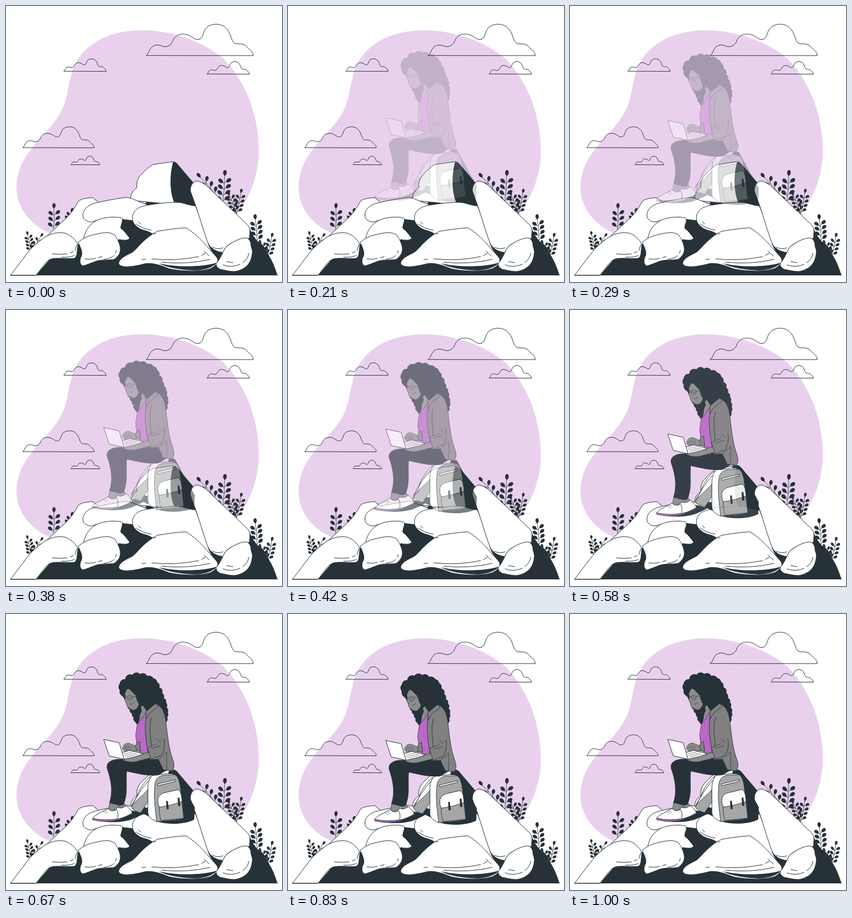
Write an HTML page that moves like this. It is 500x500 px and loops after 1040 ms.

```html
<!DOCTYPE html>
<html lang="en">
<head>
<meta charset="utf-8">
<title>Working on the mountain</title>
<style>
  html, body { margin: 0; width: 100%; height: 100%; overflow: hidden; background: #fff; }
  svg { display: block; width: 100vw; height: 100vh; }
  .line { fill: none; stroke: #263238; stroke-width: 1; stroke-linecap: round; stroke-linejoin: round; }
  .rock, .white { fill: #fff; stroke: #263238; stroke-width: 1; stroke-linejoin: round; }
  .dark { fill: #263238; }
  .skin { fill: #8c8c8c; stroke: #263238; stroke-width: .7; }
  .cloth { fill: #808080; stroke: #263238; stroke-width: .9; stroke-linejoin: round; }
  .bag { fill: #a6a6a6; stroke: #263238; stroke-width: .9; stroke-linejoin: round; }
  .purple { fill: #ba68c8; stroke: #263238; stroke-width: .7; }
  .fine { stroke-width: .7; }
  .keys { stroke: #808080; stroke-dasharray: 2 1; }
</style>
</head>
<body>
<svg viewBox="0 0 500 500">
  <defs>
    <path id="cloud" class="line" vector-effect="non-scaling-stroke"
      d="M0 0C5-3 5-10 10-15C17-21 24-19 31-16C38-15 45-18 48-26C53-38 64-41 76-37C84-34 89-27 96-29C105-33 102-44 110-51C120-59 136-58 144-50C154-41 153-27 160-22C166-19 174-24 182-16C187-9 193-9 194 0Z"/>
  </defs>

  <path fill="#e9d1ee" d="M243 44C300 43 356 64 394 95C436 139 458 200 458 262C458 310 440 350 415 382L300 440L92 416C45 402 19 365 19 328C19 275 62 243 86 212C113 178 108 160 119 122C134 70 185 45 243 44Z"/>
  <g id="clouds"></g>
  <g id="plants" class="dark"></g>

  <g id="rocks">
    <path class="dark" d="M54 488L78 460L130 425L210 388L250 362L290 300L343 325L420 390L441 402C446 413 450 421 457 427C466 432 470 438 474 448C480 458 485 466 492 488Z"/>
    <path class="rock" d="M66 424L104 389C118 377 124 366 131 354C137 348 149 348 157 347L168 356L200 400L150 430L131 432Z"/>
    <path class="rock" d="M226 352C225 341 229 335 237 329C236 317 240 310 246 304C254 296 260 290 267 287C280 285 294 283 303 282L308 360Z"/>
    <path class="dark" d="M303 282C308 282 310 285 314 290L342 323L346 370L306 358C296 340 296 304 303 282Z"/>
    <path class="rock" d="M140 384C137 371 146 361 162 357C182 352 201 349 215 347C224 346 230 350 238 353L258 361L240 390L206 386C192 380 172 386 156 391C149 392 143 388 140 384Z"/>
    <path class="rock" d="M141 420C144 404 154 394 165 388C179 382 198 381 209 384C214 388 207 396 208 403C216 408 218 414 224 420C222 426 211 424 204 423L200 440L140 440Z"/>
    <path class="rock" d="M230 391C226 375 235 364 256 361C277 357 308 354 320 357C330 360 338 362 343 362L382 455L275 420C267 414 262 409 252 407C241 404 235 399 230 391Z"/>
    <path class="rock" d="M131 428C140 420 152 415 165 413C178 410 189 409 197 415C203 424 208 434 207 443C206 451 200 456 196 459C184 461 171 459 161 463C153 466 146 469 139 471C134 468 132 462 137 452C139 444 134 436 131 428Z"/>
    <path class="rock" d="M8 488L44 441C56 429 68 419 80 414C95 409 106 410 113 414C124 421 130 428 130 435C128 445 130 453 124 457C110 459 87 454 78 460C69 466 63 478 54 488Z"/>
    <path class="rock" d="M334 335C334 325 338 319 345 317C353 318 360 322 366 328L434 393C440 398 442 402 442 408L441 421C423 422 407 428 398 437C393 447 391 452 383 456C374 450 370 437 365 427C357 405 350 380 343 360Z"/>
    <path class="rock" d="M204 466C206 456 220 451 229 446C238 440 250 420 275 408C294 405 314 402 326 402C340 410 352 422 362 433C372 445 380 452 383 457C385 463 381 470 372 475C356 482 318 481 296 476C282 471 267 464 251 467C236 471 223 473 214 472C207 471 205 469 204 466Z"/>
    <path class="dark" d="M276 466C304 473 352 474 382 465C376 473 360 479 340 479C316 478 291 474 276 466Z"/>
    <path class="dark" d="M365 429C371 438 381 446 395 446L383 457C375 449 369 440 365 429Z"/>
    <path class="rock" d="M381 466C388 459 392 447 398 437C410 427 424 420 436 420C442 423 444 429 444 436C448 444 446 452 443 461C438 472 428 479 414 481C404 481 395 478 388 477C383 474 380 471 381 466Z"/>
    <g class="line">
      <path d="M84 449Q98 451 111 449M116 447L122 445M101 455Q115 456 124 452M128 433L125 443"/>
      <path d="M143 458Q154 460 162 457M167 456L174 454M177 459Q192 457 195 452M198 448L200 443"/>
      <path d="M236 395Q248 404 263 406M240 391L244 395M267 412L271 413"/>
      <path d="M246 459L253 459M264 458Q306 463 349 454M354 452L361 448M359 444L368 453M282 464Q327 469 370 459"/>
      <path d="M374 437Q384 442 393 438"/>
      <path d="M393 469Q408 475 424 468M429 465Q438 459 440 448M400 463L411 465"/>
    </g>
    <path class="line" d="M8 487.5H492"/>
  </g>

  <g id="hiker">
    <g class="dark">
      <path d="M168 375C190 378 215 378 232 370C240 367 246 363 252 360L228 356L190 365Z"/>
      <path d="M228 352L262 368C275 384 326 382 341 372L342 350L306 284L296 282L290 300Z"/>
    </g>

    <g id="backpack">
      <path class="white" d="M262 294C250 304 241 318 237 331L228 346L259 352Z"/>
      <path class="bag" d="M257 318C247 330 238 335 227 348C229 355 236 358 244 360L257 340Z"/>
      <path class="line" d="M258 302Q240 322 228 348"/>
      <path class="white" d="M257 312C258 301 262 293 268 291C283 291 299 287 306 291C312 295 313 301 315 309C318 330 321 351 322 370C309 374 289 374 273 376C264 372 258 368 257 360Z"/>
      <path class="bag" d="M270 307C271 299 276 294 284 292L306 291C312 295 313 301 315 309C318 330 321 351 322 370C309 374 289 374 273 376C270 352 267 328 270 307Z"/>
      <path class="white" d="M274 308L307 300V303L275 311Z"/>
      <path class="bag" d="M278 340L318 333L322 370L281 374Q276 360 278 340Z"/>
      <path class="white" d="M275 336C276 328 283 324 290 323L311 318C317 319 318 329 319 340Q299 347 278 350Q274 344 275 336Z"/>
      <path class="dark" d="M290 339L293 338L295 353L291 354ZM311 333L314 332L316 347L312 348Z"/>
    </g>

    <g id="legs">
      <path class="skin" d="M188 341L185 357L201 361L204 344ZM205 342L206 356L219 352L214 342Z"/>
      <path class="purple" d="M157 369L157 373Q181 378 203 373L229 362V358L200 368Z"/>
      <path class="white" d="M177 367C186 361 196 357 203 350C209 353 213 350 218 347C223 351 227 355 229 360C220 366 212 369 203 371Z"/>
      <path class="white" d="M157 370C161 363 175 359 185 352C189 358 196 357 200 354C204 360 203 367 202 371Q178 375 157 370Z"/>
      <path class="line fine" d="M177 358L181 362M181 356L184 360"/>
      <path class="dark" d="M183 280C180 267 195 261 212 263L256 261L278 259L291 283L276 292C257 294 237 289 219 285C217 305 222 326 213 345C210 347 206 347 203 346L187 342C194 322 190 300 183 280Z"/>
    </g>

    <path class="dark" id="hair"/>
    <path class="skin" d="M238 174L248 165L255 176L252 187L239 203L241 187Z"/>
    <path class="purple" d="M238 198C245 193 250 184 254 177L258 240L258 250L244 253C239 241 235 231 235 218Z"/>
    <path class="dark" d="M230 172L244 166L246 175Q242 182 242 190L239 200Q233 195 232 188Z"/>
    <path class="skin" d="M214 143C217 147 216 151 215 156C217 158 218 159 218 162C218 168 224 172 231 174C236 173 239 169 241 163C237 158 236 150 234 143C230 136 222 133 217 136Z"/>
    <path class="dark" d="M211 150C217 144 217 138 221 135C228 138 230 145 237 148L240 132L220 124L207 137Z"/>
    <g class="line fine">
      <ellipse cx="224" cy="151.5" rx="4.5" ry="4"/>
      <path d="M219 150L216 151M229 149L238 149M225 163Q229 164 231 160M222 151L226 152"/>
    </g>

    <path class="cloth" d="M231 247L237 233L242 231L244 249Z"/>
    <path class="cloth" d="M254 176L273 163C283 168 287 178 289 190C292 213 294 240 301 260C306 272 305 281 300 284L285 282L276 263L261 264C256 249 253 225 252 207Z"/>
    <path class="cloth" d="M253 177L271 162L276 167L259 181L254 190Z"/>
    <path class="skin" d="M262 250C251 252 244 256 236 257C225 260 217 260 211 263C217 269 232 269 240 266L264 260Z"/>
    <path class="cloth" d="M264 187C258 203 262 220 263 239L256 243L263 263L281 256C286 248 288 238 286 226"/>
    <path class="line fine" d="M263 239L274 235M264 243L279 239M276 263L291 250L291 283M274 227L281 233"/>

    <path class="skin" d="M211 244C212 238 216 233 223 234L233 238L237 246L228 250L217 250Z"/>
    <path class="line fine" d="M214 245L219 238M218 247L223 239M223 248L227 241"/>
    <path class="white" d="M209 251L224 247L249 253L236 258L214 263Z"/>
    <path class="line keys" d="M214 253L230 250M215 256L236 252M217 259L239 254"/>
    <path class="white" d="M177 227L205 233L214 263L187 257Z"/>
  </g>
</svg>
<script>
  const $ = id => document.getElementById(id);

  // left, baseline and scale of each cloud
  $('clouds').innerHTML = [[254, 89.5, 1], [105, 118, .395], [364.5, 123, .395], [30.5, 256.5, .667], [118, 287.3, .267]]
    .map(([x, y, s]) => `<use href="#cloud" transform="translate(${x} ${y}) scale(${s})"/>`).join('');

  // a bowed stem along the local y axis with staggered leaves and one at the tip
  function sprig(x, y, tipX, tipY, pairs, leaf) {
    const len = Math.hypot(tipX - x, tipY - y) - leaf;
    const turn = Math.atan2(tipX - x, y - tipY) * 180 / Math.PI;
    const w = leaf * .4, bow = 2;
    const blade = (at, angle, gap) => {
      const bend = bow * 4 * at / len * (1 - at / len) / 2;
      return `<g transform="translate(${bend} ${-at}) rotate(${angle})"><path class="line fine" d="M0 0V${-gap}"/>
        <path d="M0 ${-gap}c${-w} ${-leaf * .3} ${-w} ${-leaf * .9} 0 ${-leaf}c${w} ${leaf * .1} ${w} ${leaf * .7} 0 ${leaf}Z"/></g>`;
    };
    let parts = `<path class="line fine" d="M0 0Q${bow} ${-len / 2} 0 ${-len}"/>` + blade(len, 0, 0);
    for (let i = 0; i < pairs; i++) {
      const at = len * (.1 + .82 * i / pairs);
      parts += blade(at, -52, leaf * .3) + blade(at + 2, 52, leaf * .3);
    }
    return `<g transform="translate(${x} ${y}) rotate(${turn})">${parts}</g>`;
  }
  $('plants').innerHTML = [
    [86, 405, 87, 357, 3, 10], [112, 390, 121, 366, 2, 8],
    [45, 445, 38, 408, 4, 7], [45, 443, 67, 412, 3, 7],
    [392, 360, 397, 297, 4, 11], [382, 345, 346, 303, 3, 10],
    [417, 378, 427, 331, 4, 8], [417, 376, 402, 336, 4, 8],
    [455, 430, 451, 377, 4, 10], [473, 456, 483, 411, 4, 8], [473, 454, 459, 424, 3, 7]
  ].map(a => sprig(...a)).join('');

  const curls = (r, points) => points.map(p => `A${r} ${r} 0 0 1 ${p}`).join('');
  $('hair').setAttribute('d', 'M212 149'
    + curls(9, ['206 138', '206 126', '216 118', '229 110', '243 108.5', '256 112', '267 116', '274 123', '278 133'])
    + curls(7, ['283 143', '286 152', '290 160', '291 169', '293 178', '292 187', '288 197'])
    + 'L270 185L247 178L240 200' + curls(7, ['234 195', '231 187', '228 180', '224 173', '220 166']) + 'Z');

  // cubic-bezier(.36, -.01, .5, 1.38)
  const bezier = (s, a, b) => 3 * (1 - s) ** 2 * s * a + 3 * (1 - s) * s * s * b + s ** 3;
  function ease(x) {
    let lo = 0, hi = 1;
    for (let i = 0; i < 24; i++) {
      const mid = (lo + hi) / 2;
      if (bezier(mid, .36, .5) < x) lo = mid; else hi = mid;
    }
    return bezier(hi, -.01, 1.38);
  }

  const LOOP = 1040, FPS = 24;
  function draw() {
    const step = Math.floor(performance.now() % LOOP * FPS / 1000 + .1);
    const v = ease(Math.min(1, (step + .5) / FPS));
    $('hiker').setAttribute('opacity', step < 3 ? 0 : Math.min(1, v));
    $('hiker').setAttribute('transform', `translate(0 ${30 * (v - 1)})`);
    requestAnimationFrame(draw);
  }
  draw();
</script>
</body>
</html>
```
